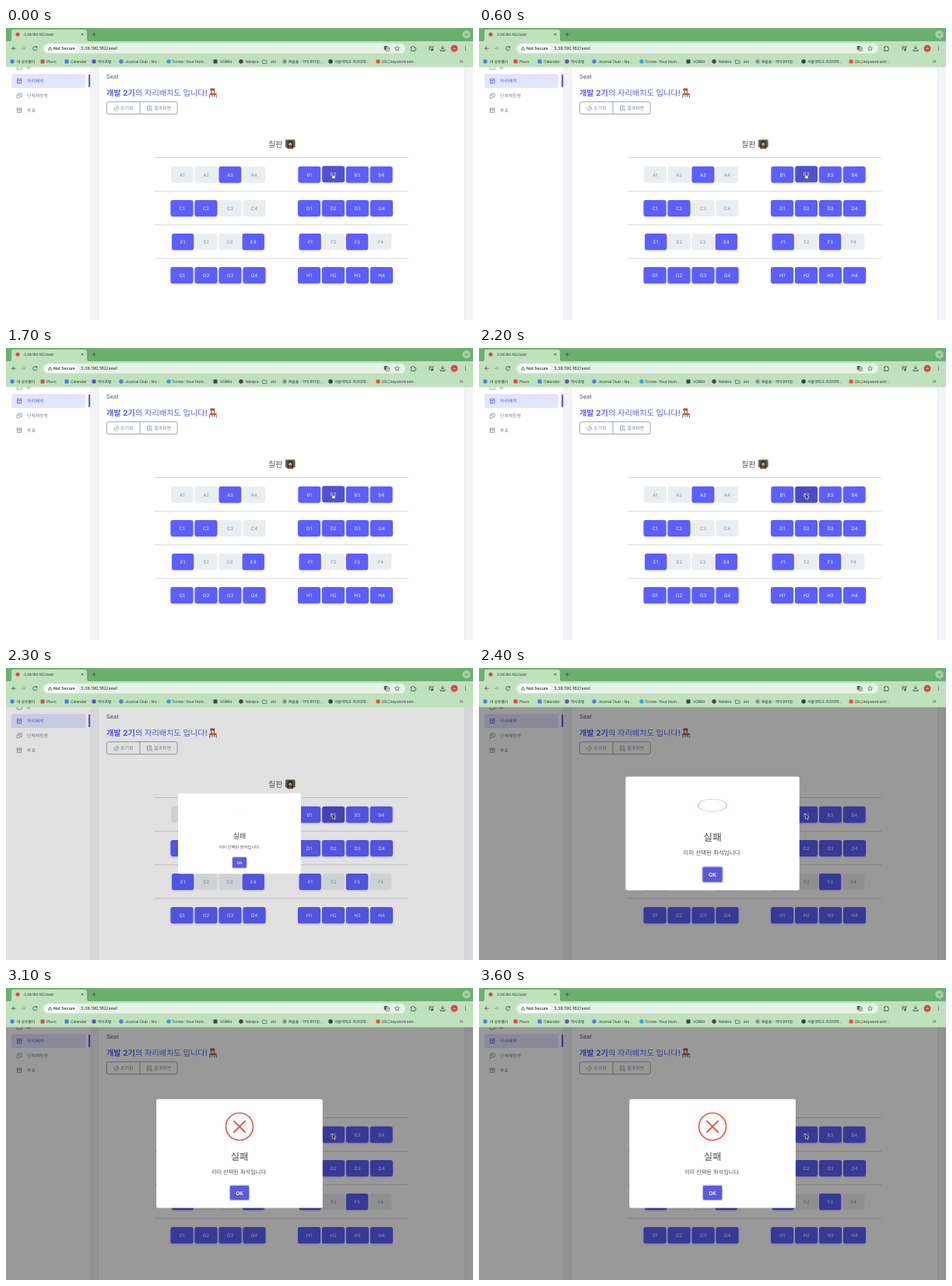
An HTML page for the animation above (3.7 s loop, 600 px wide and 375 px high).

```html
<!DOCTYPE html>
<html lang="ko">
<head>
<meta charset="utf-8">
<title>Seat</title>
<style>
html, body { margin: 0; height: 100%; overflow: hidden; }
svg { display: block; width: 600px; height: 375px; }
text { font-family: Inter, "Noto Sans CJK KR", sans-serif; text-rendering: geometricPrecision; }
</style>
</head>
<body>
<svg id="stage" viewBox="0 0 600 375"></svg>
<script>
const LOOP = 3700, STEP = 100, PRESS = 2100, ARROW = 2200, OPEN = 2285;
const BLUE = '#5c5ffa', SLATE = '#7b899b', DARK = '#3a4a3c', RED = '#e95c4e';

// Markup helpers; text is placed by its vertical centre
const text = (x, cy, str, size, fill, more = '') =>
  `<text x="${x}" y="${cy + size * .36}" font-size="${size}" fill="${fill}" ${more}>${str}</text>`;
const mid = (x, cy, str, size, fill, more = '') => text(x, cy, str, size, fill, `text-anchor="middle" ${more}`);
const rect = (x, y, w, h, r, fill, more = '') =>
  `<rect x="${x}" y="${y}" width="${w}" height="${h}" rx="${r}" fill="${fill}" ${more}/>`;
const dot = (x, y, r, fill, more = '') => `<circle cx="${x}" cy="${y}" r="${r}" fill="${fill}" ${more}/>`;
const line = (d, stroke, width = .8, more = '') =>
  `<path d="${d}" fill="none" stroke="${stroke}" stroke-width="${width}" ${more}/>`;
const shape = (d, fill, more = '') => `<path d="${d}" fill="${fill}" ${more}/>`;

function seatRow(name, cx, cy, pitch, taken) {
  const left = cx - (4 * pitch - 2) / 2;
  return [1, 2, 3, 4].map(n => {
    const x = left + (n - 1) * pitch, w = pitch - 2, on = taken.includes(n);
    const id = name + n === 'B2' ? 'id="picked"' : '';
    return `<g ${id}>` +
      rect(x, cy - 10.5, w, 21, 2.8, on ? BLUE : '#ebeef0', on ? 'filter="url(#glow)"' : '') +
      mid(x + w / 2, cy + .1, name + n, 6.1, on ? '#f4f4ff' : '#8592a3') + '</g>';
  }).join('');
}

const seats = [
  ['A', 30.8, [3], 'B', 30.8, [1, 2, 3, 4]],
  ['C', 31, [1, 2], 'D', 31, [1, 2, 3, 4]],
  ['E', 30.2, [1, 4], 'F', 30.2, [1, 3]],
  ['G', 31, [1, 2, 3, 4], 'H', 31, [1, 2, 3, 4]]
].map(([a, pa, ta, b, pb, tb], i) => {
  const y = 188.3 + i * 43.1;
  return rect(191, y - 22.1, 326, .8, 0, '#c9ced5') +
    seatRow(a, 272.5, y, pa, ta) + seatRow(b, 436, y, pb, tb);
}).join('');

const sidebar =
  rect(0, 50, 108, 325, 0, '#fff') +
  text(26, 50, '홈', 5.9, SLATE) + line('M14 49v4h6v-4', SLATE) +
  rect(7, 59, 95, 18, 2.5, '#e4e4fd') + rect(106, 59.5, 2.2, 16.5, 1, BLUE) +
  line('M14.4 65.4h5.4v5.6h-5.4zM14.4 67.3h5.4M17 67.3v3.7', BLUE) +
  text(27, 68.2, '자리배치', 5.9, BLUE, 'font-weight="500"') +
  line('M15.6 86v-2h4.6v4.4h-1.2M14 86h4v3.2h-2l-1.4 1.4v-1.4h-.6z', SLATE, .7) +
  text(27, 87.1, '단체채팅방', 5.9, SLATE) +
  line('M14 103h6v1.8h-6zM14.5 104.8v3.8h5v-3.8M16 106.3h2', SLATE) +
  text(27, 105.8, '투표', 5.9, SLATE);

const chair =
  line('M263.2 78.3l1 6.5M267.6 78.3l-.3 5.6M262 85l-.3 4.6M270 85l.3 4.6M264.8 86v2.6M267.6 86v2.6', '#8b4a32', 1) +
  rect(262.3, 77.6, 6, 2.8, 1, '#a9563a') + rect(261.6, 83.7, 9, 2.2, .8, '#b8623f');

const teacher =
  rect(359.2, 143.7, 12, 9.5, .8, '#51655c', 'stroke="#8a6748" stroke-width=".7"') +
  shape('M361.5 155v-5.5a3.7 5 0 0 1 7.4 0v5.5z', '#352922') +
  dot(365.2, 149.2, 2.3, '#c98f6c') +
  shape('M361.7 155.3q.3-3 3.5-3t3.5 3z', '#7d4960');

const page =
  rect(0, 50, 600, 325, 0, '#f3f3f8') + sidebar +
  rect(119, 40, 470, 340, 2, '#fff', 'filter="url(#soft)"') +
  text(129, 62.7, 'Seat', 7.4, '#4b5768') +
  text(129, 83, '<tspan font-weight="700">개발 2기</tspan>의 자리배치도 입니다!', 10.2, BLUE, 'font-weight="500"') + chair +
  rect(129.4, 94.8, 90.8, 15.8, 2.5, 'none', 'stroke="#8592a3" stroke-width=".8"') +
  line('M172 95v15.5', '#8592a3') +
  line('M139.5 101.3a2.8 2.8 0 1 0 3-.8M143.3 99l-1.6 1.5l1.6 1.3M141.5 102v1.6h1', SLATE, .7) +
  text(147, 102.7, '초기화', 6, SLATE) +
  line('M186.5 102v-2h-5v6h2.6M182.8 101.8h2.4M182.8 103.6h1.4M187.7 106.6l-1-1', SLATE, .7) +
  dot(186, 104.5, 1.4, 'none', `stroke="${SLATE}" stroke-width=".7"`) +
  text(190, 102.7, '결과화면', 6, SLATE) +
  text(337, 149.2, '칠판', 10, '#4f5f73') + teacher + seats;

// Bookmarks: icon x, icon colour, round icon, text x, label
const marks = [
  [8, '#4a83e0', 1, 14, '내 공유폴더'],
  [47, '#df4b40', 0, 52, 'Pluvo'],
  [78, '#4080e4', 0, 83, 'Calendar'],
  [113, '#5a55b8', 1, 118, '학사포털'],
  [148, '#4a83e0', 1, 153, 'Journal Club - No...'],
  [209, '#30a8dc', 1, 213, 'Torvex: Your Hom...'],
  [269, '#334b42', 0, 275, 'VORIN'],
  [302, '#444', 1, 308, 'Nimbra'],
  [358, '#71a584', 1, 363, '배움솔 - 라이프타임...'],
  [417, '#30443a', 1, 422, '서울대학교 치과대학...'],
  [478, '#e65338', 1, 483, '[DL] keyword extr...']
].map(([x, fill, round, tx, label]) =>
  (round ? dot(x, 43, 2.7, fill) : rect(x - 2.5, 40.5, 5, 5, .6, fill)) +
  text(tx, 43, label, /[가-힣]/.test(label) ? 4.8 : 4.9, '#26352a', 'letter-spacing="-.04"')).join('');

const chrome =
  rect(0, 0, 600, 18, 0, '#6bb06e') + rect(0, 17, 600, 33.3, 0, '#c0e1be') +
  shape('M4 17.2q3 0 3-3V5q0-3 3-3h91q3 0 3 3v9.2q0 3 3 3z', '#c0e1be') +
  dot(15, 8.3, 2.5, '#d84a42') +
  text(23, 8.2, '3.38.190.162/seat', 4.7, '#24352a') +
  line('M96.6 6.7l3 3m0-3l-3 3M110.8 8.3h5M113.3 5.8v5', DARK, .7) +
  dot(591.5, 8.3, 5.2, '#a5d0a5') + line('M589.7 7.6l1.8 1.7l1.8-1.7', DARK) +
  line('M12.6 26.2H7.7M10 23.8l-2.4 2.4l2.4 2.4', DARK) +
  line('M19.7 26.2h4.9M22.3 23.8l2.4 2.4l-2.4 2.4', '#8ba78c') +
  line('M39.2 24.6a2.6 2.6 0 1 0 .5 2.4M39.7 23.2v2h-2', DARK) +
  rect(48, 19.8, 465, 13, 6.5, '#e5f3e4') + rect(51, 21, 41, 10.6, 5.3, '#fff') +
  line('M56.5 24l2.4 4.2h-4.8zM56.5 25.4v1.4', DARK, .6) +
  text(61, 26.3, 'Not Secure', 5.2, '#26352a', 'font-weight="600"') +
  text(96, 26.3, '3.38.190.162/seat', 5.8, '#26352a') +
  rect(485.7, 23, 4.2, 5, .6, '#55675a') + rect(488.2, 24.6, 4.2, 5, .6, '#e5f3e4', `stroke="${DARK}" stroke-width=".6"`) +
  line('M489.1 26.3h2.4M491.3 26.3l-1.8 2M489.5 26.6l1.7 1.8', DARK, .5) +
  line('M502.5 23.2l.9 2l2.2.2l-1.7 1.5l.5 2.2l-1.9-1.2l-1.9 1.2l.5-2.2l-1.7-1.5l2.2-.2z', DARK, .6) +
  line('M520.5 24.4h1.6a1 1 0 0 1 2 0h1.6v1.6a1 1 0 0 1 0 2v1.4h-5.2v-1.5a1 1 0 0 0 0-1.9z', DARK) +
  line('M543 24h4.2M543 25.9h4.2M543 27.8h2M548.3 28v-4.3h1.5', DARK) + dot(547.4, 28.2, 1.2, DARK) +
  line('M561 22.8v4.2M559 25.3l2 2l2-2M558 27.6v1.7h6v-1.7', DARK, .9) +
  dot(576, 26.3, 4.5, '#dc4b45') + rect(574.3, 25.9, 3.4, .8, .3, '#f6cfca') +
  [24.2, 26.2, 28.2].map(y => dot(590.4, y, .6, DARK)).join('') +
  marks + shape('M329.3 41h2.1l.7.8h2.9v3.7h-5.7z', 'none', `stroke="${DARK}" stroke-width=".6"`) +
  text(340, 43, 'etc', 4.9, '#26352a') +
  line('M583 41.2l1.7 1.8l-1.7 1.8M585.4 41.2l1.7 1.8l-1.7 1.8', DARK, .7);

const modal =
  rect(193.2, 142.8, 213.6, 139.6, 2, '#fff') +
  `<g id="ring">${dot(0, 0, 17.5, 'none', `stroke="${RED}" stroke-width="1.7"`)}</g>` +
  `<g id="cross">${line('M-7 -7L7 7M7 -7L-7 7', RED, 2.1, 'stroke-linecap="round"')}</g>` +
  mid(300, 217, '실패', 12.2, '#4a4a4d', 'font-weight="500"') +
  mid(300, 236.2, '이미 선택된 좌석입니다.', 7.2, '#505053') +
  rect(286.9, 252.8, 26.2, 20.4, 2.5, '#bdbcf0') + rect(288, 253.9, 24, 18.2, 1.7, '#5d5ad9') +
  mid(300, 263.2, 'OK', 6.6, '#fff', 'font-weight="600"');

stage.innerHTML = `<defs>
  <filter id="glow" x="-20%" y="-20%" width="140%" height="150%"><feDropShadow dx="0" dy=".9" stdDeviation=".9" flood-color="${BLUE}" flood-opacity=".4"/></filter>
  <filter id="soft" x="-3%" y="-3%" width="106%" height="106%"><feDropShadow dx="0" dy=".8" stdDeviation="1.3" flood-color="#435971" flood-opacity=".14"/></filter>
  </defs>${page}${rect(0, 50, 600, 325, 0, '#000', 'id="shade"')}${chrome}<g id="modal">${modal}</g>` +
  `<g id="hand">${shape('M419 191v-3.6q0-.8.7-.8t.7.8v1.9l2.2.5q.8.2.7 1.1l-.4 2.9h-3.2l-2-2.6q.3-1 1.3-.2z', '#fff', 'stroke="#222" stroke-width=".6"')}</g>` +
  `<g id="arrow">${shape('M419.3 187v6.7l1.5-1.4l1 2.4l1.2-.5l-1-2.3h2.1z', '#111', 'stroke="#fff" stroke-width=".6"')}</g>`;

const el = id => document.getElementById(id);
const set = (id, attrs) => { for (const k in attrs) el(id).setAttribute(k, attrs[k]); };
const clamp = v => Math.min(1, Math.max(0, v));

// CSS "ease": cubic-bezier(.25, .1, .25, 1)
function ease(x) {
  let lo = 0, hi = 1;
  const curve = (a, b, s) => 3 * a * s * (1 - s) ** 2 + 3 * b * s * s * (1 - s) + s ** 3;
  for (let i = 0; i < 24; i++) {
    const m = (lo + hi) / 2;
    if (curve(.25, .25, m) < x) lo = m; else hi = m;
  }
  return curve(.1, 1, lo);
}

// Value at p along [position, value] stops, eased within each segment
function track(p, ...stops) {
  const i = Math.max(1, stops.findIndex(s => s[0] >= p));
  const [a, from] = stops[i - 1], [b, to] = stops[i];
  return from + (to - from) * ease((p - a) / (b - a));
}

function draw(t) {
  const age = t - OPEN, p = clamp(age / 300), q = clamp(age / 500);
  const open = age >= 0;

  const lift = t < PRESS ? -.5 : 0;
  set('picked', { transform: `translate(0 ${lift})` });
  el('picked').firstChild.setAttribute('fill', t < PRESS ? '#5051d2' : t < 2400 ? '#4b4cc9' : BLUE);
  set('hand', { visibility: t < ARROW ? 'visible' : 'hidden' });
  set('arrow', { visibility: t < ARROW ? 'hidden' : 'visible' });

  set('shade', { opacity: open ? .4 * ease(clamp((age + 5) / 100)) : 0 });
  const zoom = track(p, [0, .7], [.45, 1.05], [.8, .95], [1, 1]);
  set('modal', {
    visibility: open ? 'visible' : 'hidden',
    transform: `translate(300 212.7) scale(${zoom}) translate(-300 -212.7)`
  });

  const turn = ease(q);
  const tilt = Math.cos((1 - turn) * 100 * Math.PI / 180);
  set('ring', { opacity: turn, transform: `translate(300 178) scale(1 ${tilt})` });
  const drop = 6.67 * track(q, [0, 1.625], [.5, 1.625], [.8, -.375], [1, 0]);
  const size = track(q, [0, .4], [.5, .4], [.8, 1.15], [1, 1]);
  set('cross', {
    opacity: track(q, [0, 0], [.5, 0], [1, 1]),
    transform: `translate(300 ${178 + drop}) scale(${size})`
  });
}

function tick(now) {
  draw(Math.floor(now % LOOP / STEP) * STEP);
  requestAnimationFrame(tick);
}
draw(0);
requestAnimationFrame(tick);
</script>
</body>
</html>
```
